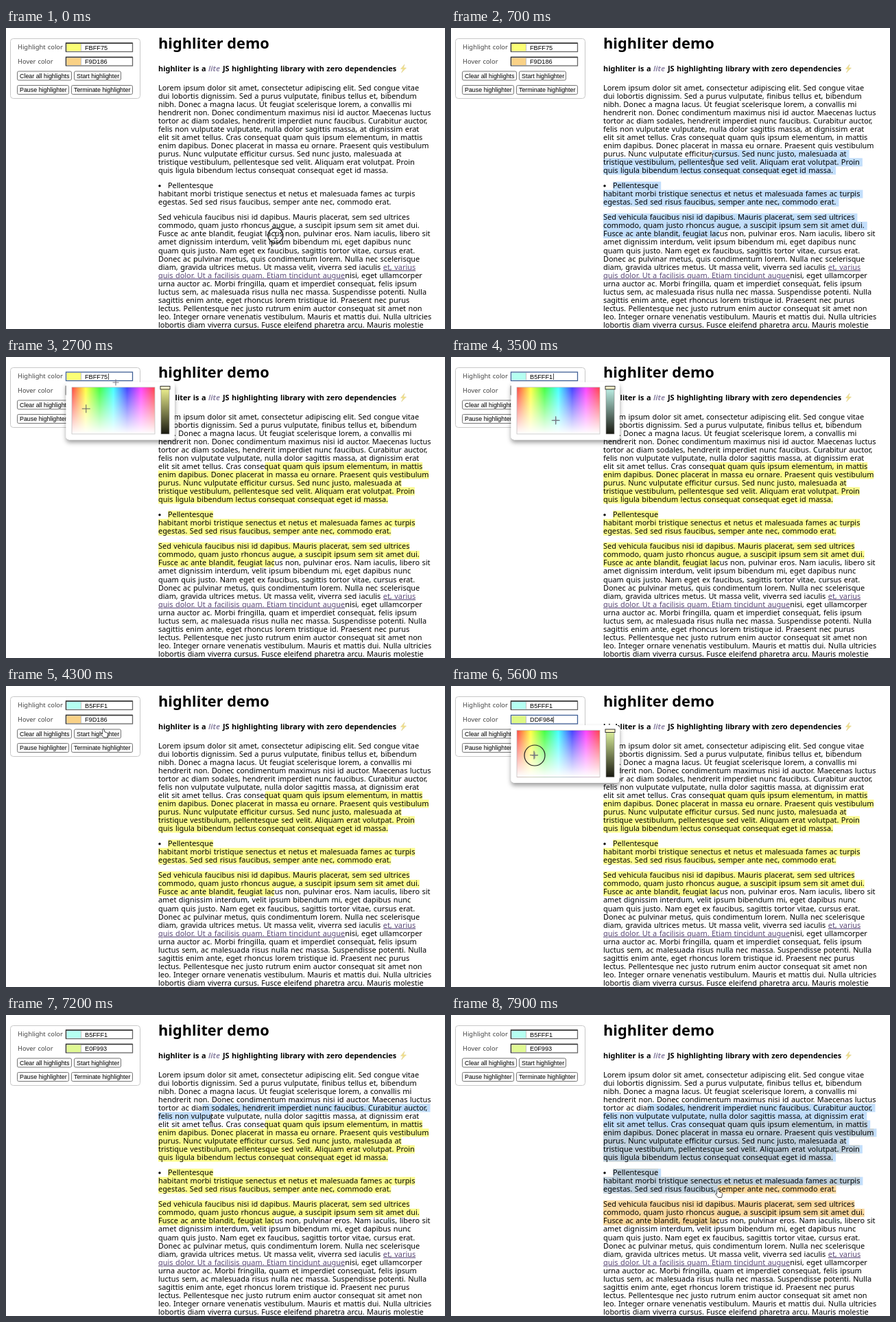
Write an HTML page that moves like this. It is 640 px wide and 438 px high and loops after 8000 ms.

```html
<!DOCTYPE html>
<html lang="en">
<head>
<meta charset="utf-8">
<title>highliter demo</title>
<style>
html, body { margin: 0; width: 100%; height: 100%; overflow: hidden; background: #fff }
svg { display: block }
text { font-family: "Noto Sans", "Open Sans", sans-serif; font-size: 10.92px; word-spacing: .6px; fill: #000 }
.bold { font-weight: 700 }
.link { fill: #5c4b78; text-decoration: underline }
.label { font-size: 9.4px; fill: #444 }
.ui { font: 8.9px "Liberation Sans", Arial, sans-serif; word-spacing: 0 }
.field { font-size: 9.2px }
</style>
</head>
<body>
<svg width="640" height="438" viewBox="0 0 640 438">
  <defs>
    <linearGradient id="hue"></linearGradient>
    <linearGradient id="fade" x2="0" y2="1">
      <stop stop-color="#fff" stop-opacity=".2"/><stop offset="1" stop-color="#fff"/>
    </linearGradient>
    <filter id="shadow" x="-10%" y="-10%" width="120%" height="140%">
      <feDropShadow dx="0" dy="4" stdDeviation="3" flood-opacity=".38"/>
    </filter>
  </defs>
  <g id="marks"></g>
  <g id="page">
    <text class="bold" x="222" y="29.5" style="font-size:21.8px;word-spacing:0">highliter demo</text>
    <text class="bold" x="222" y="62.7">highliter is a</text>
    <text class="bold" x="295" y="62.7" font-style="italic" style="fill:#8d84a4">lite</text>
    <text class="bold" x="316" y="62.7">JS highlighting library with zero dependencies</text>
    <path d="M581 53l-5.500 6.500h3.500l-2.500 5.500 7-7h-4z" fill="#f3e28a" stroke="#d8c88a" stroke-width=".5"/>
    <circle cx="224" cy="229.700" r="1.700"/>
  </g>
  <g id="panel"></g>
  <g id="over"></g>
</svg>
<script>
const $ = id => document.getElementById(id);
const LOOP = 8000, STEP = 100;

const paragraphs = [
  [90.7, `Lorem ipsum dolor sit amet, consectetur adipiscing elit. Sed congue vitae
dui lobortis dignissim. Sed a purus vulputate, finibus tellus et, bibendum
nibh. Donec a magna lacus. Ut feugiat scelerisque lorem, a convallis mi
hendrerit non. Donec condimentum maximus nisi id auctor. Maecenas luctus
tortor ac diam sodales, hendrerit imperdiet nunc faucibus. Curabitur auctor,
felis non vulputate vulputate, nulla dolor sagittis massa, at dignissim erat
elit sit amet tellus. Cras consequat quam quis ipsum elementum, in mattis
enim dapibus. Donec placerat in massa eu ornare. Praesent quis vestibulum
purus. Nunc vulputate efficitur cursus. Sed nunc justo, malesuada at
tristique vestibulum, pellentesque sed velit. Aliquam erat volutpat. Proin
quis ligula bibendum lectus consequat consequat eget id massa.`],
  [233.2, `Pellentesque
habitant morbi tristique senectus et netus et malesuada fames ac turpis
egestas. Sed sed risus faucibus, semper ante nec, commodo erat.`],
  [279.4, `Sed vehicula faucibus nisi id dapibus. Mauris placerat, sem sed ultrices
commodo, quam justo rhoncus augue, a suscipit ipsum sem sit amet dui.
Fusce ac ante blandit, feugiat lacus non, pulvinar eros. Nam iaculis, libero sit
amet dignissim interdum, velit ipsum bibendum mi, eget dapibus nunc
quam quis justo. Nam eget ex faucibus, sagittis tortor vitae, cursus erat.
Donec ac pulvinar metus, quis condimentum lorem. Nulla nec scelerisque
diam, gravida ultrices metus. Ut massa velit, viverra sed iaculis [et, varius]
[quis dolor. Ut a facilisis quam. Etiam tincidunt augue]nisi, eget ullamcorper
urna auctor ac. Morbi fringilla, quam et imperdiet consequat, felis ipsum
luctus sem, ac malesuada risus nulla nec massa. Suspendisse potenti. Nulla
sagittis enim ante, eget rhoncus lorem tristique id. Praesent nec purus
lectus. Pellentesque nec justo rutrum enim auctor consequat sit amet non
leo. Integer ornare venenatis vestibulum. Mauris et mattis dui. Nulla ultricies
lobortis diam viverra cursus. Fusce eleifend pharetra arcu. Mauris molestie`]
];

const lines = paragraphs.flatMap(([top, body]) => body.split("\n").map((s, i) => {
  const el = document.createElementNS("http://www.w3.org/2000/svg", "text");
  const x = s === "Pellentesque" ? 236 : 222, y = top + 12.03 * i;
  el.setAttribute("x", x);
  el.setAttribute("y", y);
  el.innerHTML = s.replace(/\[(.*?)\]/g, '<tspan class="link">$1</tspan>');
  $("page").append(el);
  return { x, top: y - 9.6, end: x + el.getComputedTextLength() };
}));

$("hue").innerHTML = [0, 60, 120, 180, 240, 300, 360]
  .map(h => `<stop offset="${h / 360}" stop-color="hsl(${h},100%,54%)"/>`).join("");

// Each key is [time, ...values]
const cursorKeys = [
  [0, 393, 302], [200, 393, 300], [900, 378, 160], [1200, 378, 147], [1500, 378, 147],
  [2200, 150, 30], [2500, 152, 30], [2700, 160, 37], [3000, 140, 84.8], [3400, 152.7, 92.3],
  [3600, 152.7, 92.3], [3900, 215, 75], [4300, 142, 68], [4500, 140, 50], [4800, 140, 50],
  [5300, 122, 101], [5600, 122, 101], [5900, 121, 105], [6100, 121, 105],
  [6500, 352, 85], [6800, 286, 136], [7000, 286, 136], [7900, 389, 258.5]
];
const clicks = [-200, 1300, 2300, 3000, 3700, 4600, 5500, 6100, 6900];
const fields = [
  { label: "Highlight color", y: 22, v: 1, open: 2400, close: 3800,
    hs: [[0, 61.74, .541], [2999, 61.74, .541], [3000, 130, .4], [3400, 168.7, .29]] },
  { label: "Hover color", y: 42.5, v: 249 / 255, open: 4700, close: 6200,
    hs: [[0, 39.1, .462], [5499, 39.1, .462], [5500, 74.35, .47], [5600, 74.35, .47], [5900, 74.7, .41]] }
];
const buttons = [
  [16, 63, 80, "Clear all highlights"], [99, 63, 69, "Start highlighter"],
  [16, 83.500, 76, "Pause highlighter"], [95, 83.500, 90, "Terminate highlighter"]
];

function at(keys, t) {
  const i = keys.findIndex(k => k[0] > t);
  if (i < 0) return keys.at(-1).slice(1);
  const a = keys[i - 1], b = keys[i], u = (t - a[0]) / (b[0] - a[0]);
  return a.slice(1).map((p, j) => p + (b[j + 1] - p) * u * u * (3 - 2 * u));
}

function hex(h, s, v) {
  const channel = n => {
    const k = (n + h / 60) % 6;
    return v * (1 - s * Math.max(0, Math.min(k, 4 - k, 1)));
  };
  return [5, 3, 1].map(n => Math.round(channel(n) * 255).toString(16).padStart(2, "0")).join("").toUpperCase();
}

const rect = (x, y, w, h, fill, more = "") =>
  `<rect x="${x}" y="${y}" width="${w}" height="${h}" fill="${fill}" ${more}/>`;
const label = (x, y, cls, s) => `<text x="${x}" y="${y}" class="${cls}">${s}</text>`;
const cross = (x, y, r, color) =>
  `<path d="M${x - r} ${y}h${2 * r}M${x} ${y - r}v${2 * r}" stroke="${color}" stroke-width="1.1"/>`;

// Colours the text between two [line, x] positions
function band(from, to, color, extra = 0) {
  let out = "";
  for (let i = from[0]; i <= to[0]; i++) {
    const l = lines[i];
    const a = i === from[0] ? from[1] : l.x, b = i === to[0] ? to[1] : l.end + extra;
    if (b > a) out += rect(a, l.top, b - a, 12.03, color);
  }
  return out;
}

const markStart = [6, 378], markEnd = [16, 391];
const lineAt = y => Math.max(0, lines.findLastIndex(l => l.top <= y));

function drawMarks(t, x, y) {
  const row = lineAt(y), blue = "rgba(168,208,250,.7)";
  let out = "";
  if (t >= 1600) {
    const hover = t > 6900 && row >= 6 && (row > 6 || x > 378);
    out += band(markStart, markEnd, hover ? "#fbd9a0" : "#fcfc90");
  }
  if (t >= 200 && t < 1400) out += band(t < 900 ? [row, x] : markStart, markEnd, blue, 4);
  if (t >= 7000) out += band([4, 286], [row, x], blue, 4);
  return out;
}

function drawField(f, t) {
  const [h, s] = at(f.hs, t), code = hex(h, s, f.v), y = f.y, focus = t >= f.open && t < f.close;
  return label(17, y + 9.3, "label", f.label) +
    rect(87.5, y, 97, 12.5, "#fff", `stroke="${focus ? "#3f5f96" : "#666"}" stroke-width="1.3"`) +
    (focus ? "" : `<path d="M87.500 ${y + 12.5}V${y}h97" fill="none" stroke="#333" stroke-width="1.3"/>`) +
    rect(88.5, y + 1, 20.5, 10.5, "#" + code) + rect(109, y + 1, .7, 10.5, "#aaa") +
    label(115, y + 9.5, "ui field", code) +
    (focus ? rect(149, y + 2, .8, 9, "#222") : "");
}

function drawPicker(f, t) {
  if (t < f.open || t >= f.close) return "";
  const [h, s] = at(f.hs, t), y = f.y + 22, id = "strip" + f.y * 2;
  return `<linearGradient id="${id}" x2="0" y2="1"><stop stop-color="#${hex(h, s * .75, .96)}"/><stop offset="1" stop-color="#181810"/></linearGradient>` +
    rect(87.5, y - 7.5, 158.5, 84, "#fff", 'rx="5" filter="url(#shadow)"') +
    rect(96, y, 121, 68, "url(#hue)") + rect(96, y, 121, 68, "url(#fade)", 'stroke="#bbb" stroke-width=".7"') +
    rect(226, y, 12, 68, `url(#${id})`, 'stroke="#888" stroke-width=".6"') +
    rect(225, y - 1.5, 14, 4.5, "#fff8c8", 'stroke="#333"') +
    cross(96 + h / 360 * 121, y + (1 - s) * 68, 6, "#666");
}

const shapes = {
  beam: '<path d="M-2.500-5q2.500 0 2.500 2 0-2 2.500-2M0-3V3M-2.500 5q2.500 0 2.500-2 0 2 2.500 2" fill="none" stroke="#333"/>',
  hand: '<path d="M-1-5q1.300-1 2 0l1 4 3.500 1q1.500.5 1 3l-1 4h-5l-4-4.500q0-1.500 2-.5z" fill="#fff" stroke="#444" stroke-width=".9"/>',
  arrow: '<path d="M0 0v11l2.700-2.500 1.800 4 1.700-.8-1.800-3.700h3.600z" fill="#111" stroke="#fff" stroke-width=".8"/>',
  cross: cross(0, 0, 4.5, "#778")
};

function cursorShape(t, x, y) {
  if (fields.some(f => t > f.open + 200 && t < f.close && x < 246)) return "cross";
  if (t >= 1000 && t < 1700) return "hand";
  if (t > 6900 && lineAt(y) > 6) return "hand";
  if (x > 220) return "beam";
  if (x > 87 && x < 185 && y > 21 && y < 57) return "beam";
  return x < 185 && y > 62 && y < 98 ? "hand" : "arrow";
}

function drawCursor(t, x, y) {
  const age = t - clicks.findLast(c => c <= t), r = 19 - age / 25;
  const ring = age < 250 ? `<circle r="${r}" fill="none" stroke="#222" stroke-width="1.2"/>` : "";
  return `<g transform="translate(${x} ${y})">${shapes[cursorShape(t, x, y)]}${ring}</g>`;
}

function draw(t) {
  const [x, y] = at(cursorKeys, t);
  $("marks").innerHTML = drawMarks(t, x, y);
  $("panel").innerHTML = rect(6.5, 15.5, 189, 87, "#fff", 'rx="4" stroke="#c8c8c8"') +
    fields.map(f => drawField(f, t)).join("") +
    buttons.map(([bx, by, w, s]) => rect(bx + .5, by, w - 1, 13, "#fafafa", 'rx="2" stroke="#777"') +
      label(bx + 4, by + 9.6, "ui", s)).join("");
  const tip = t >= 1000 && t < 1600
    ? rect(356, 134, 43, 13, "#444", 'rx="2" opacity=".94"') +
      '<path d="M374 147h8l-4 4z" fill="#444"/><text x="359" y="143.500" style="font-size:9px;fill:#ccc">highlight</text>' : "";
  $("over").innerHTML = tip + fields.map(f => drawPicker(f, t)).join("") + drawCursor(t, x, y);
}

const start = performance.now();
let shown = -1;
function frame() {
  const t = Math.floor((performance.now() - start) % LOOP / STEP) * STEP;
  if (t !== shown) draw(shown = t);
  requestAnimationFrame(frame);
}
frame();
</script>
</body>
</html>
```
